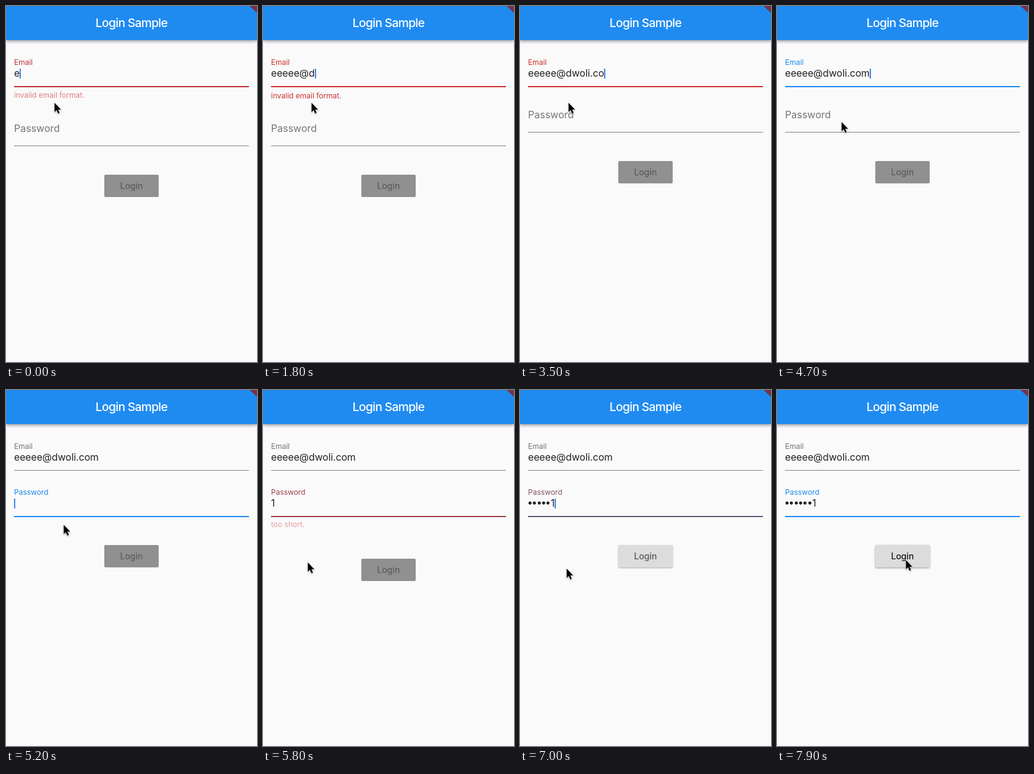
An HTML page for the animation above (8000 ms loop, 406x574 px).

```html
<!DOCTYPE html>
<html lang="en">
<head>
<meta charset="utf-8">
<title>Login Sample</title>
<style>
:root { --blue: #1f8bf1; --red: #d03030; --grey: #757575; }
html, body { margin: 0; width: 100%; height: 100%; overflow: hidden; background: #fafafa; }
#stage { position: relative; width: 406px; height: 574px; overflow: hidden; background: #fafafa;
  font-family: Inter, Roboto, sans-serif; color: #222; }
#stage * { box-sizing: border-box; }
.abs, .label, .value, .line, .error { position: absolute; white-space: nowrap; }
.anim { animation: 8s linear infinite; }

#bar { left: 0; top: 0; width: 406px; height: 55px; background: var(--blue);
  box-shadow: 0 2px 5px rgba(0,0,0,.4); color: #fff; text-align: center;
  font-size: 19.3px; font-weight: 500; letter-spacing: -.7px; line-height: 55px; }
#corner { right: 0; top: 0; width: 12px; height: 11px; background: #74324a;
  clip-path: polygon(0 0, 100% 0, 100% 100%); }

.label, .error { left: 13px; font-size: 12px; line-height: 16px; }
.value { left: 13px; height: 20px; line-height: 20px; font-size: 15.8px; letter-spacing: -.05px; white-space: pre; }
.line { left: 13px; width: 380px; height: 2px; }
.error { color: var(--red); }
.caret { display: inline-block; width: 2px; height: 16px; vertical-align: -2.5px; background: #4285e8; }
.dot { display: inline-block; width: 7.35px; height: 16px; vertical-align: -2.3px;
  background: radial-gradient(circle at 3.2px 8.2px, #222 2.1px, transparent 2.9px); }

#mailLabel { top: 83px; animation-name: mailLabel; }
#mail { top: 99px; }
#mailLine { top: 129px; animation-name: mailLine; }
#mailError { top: 137px; animation-name: mailError; }

#passBox { left: 0; top: 0; width: 406px; height: 0; animation-name: passShift; }
#passLabel { top: 165px; font-size: 16px; line-height: 20px; transform-origin: 0 50%; animation-name: passLabel; }
#pass { top: 173px; }
#passLine { top: 203px; animation-name: passLine; }
#passError { top: 211px; animation-name: passError; }

#btn { left: 159px; top: 250px; width: 88px; height: 36px; border-radius: 2px; text-align: center;
  font-size: 14px; font-weight: 500; line-height: 35px; animation-name: btnShift, btnLook; }
#mouse { left: 0; top: 0; overflow: visible; animation-name: mouse; }

@keyframes mailLabel {
  0% { color: #b5363c; } 2.5%, 44.1% { color: var(--red); }
  46.5%, 61.9% { color: var(--blue); } 64.4%, 100% { color: var(--grey); }
}
@keyframes mailLine {
  0% { background: #bd343b; } 2.5%, 44.1% { background: var(--red); }
  46.5%, 61.9% { background: var(--blue); height: 2px; }
  64.4%, 100% { background: #868686; height: 1px; }
}
@keyframes mailError {
  0% { opacity: .62; transform: translateY(-1.5px); }
  2%, 43.24% { opacity: 1; transform: none; }
  43.25%, 100% { opacity: 0; transform: none; }
}
@keyframes passShift {
  0%, 43.24% { transform: translateY(22px); }
  43.25%, 100% { transform: none; }
}
@keyframes passLabel {
  0%, 61.9% { transform: none; color: var(--grey); }
  64.4% { transform: translateY(-10.5px) scale(.75); color: var(--blue); }
  71.2% { color: var(--blue); } 72.5% { color: #9c434c; }
  74%, 86.2% { color: var(--red); } 87.5% { color: #85555f; }
  89%, 100% { transform: translateY(-10.5px) scale(.75); color: var(--blue); }
}
@keyframes passLine {
  0%, 61.9% { background: #868686; height: 1px; }
  64.4%, 71.2% { background: var(--blue); height: 2px; }
  72.5% { background: #a3414a; }
  74%, 86.2% { background: var(--red); } 87.5% { background: #5f6080; }
  89%, 100% { background: var(--blue); height: 2px; }
}
@keyframes passError {
  0%, 71.2% { opacity: 0; transform: translateY(-4px); }
  72.5% { opacity: .45; transform: translateY(-2px); }
  74%, 86.24% { opacity: 1; transform: none; }
  86.25%, 100% { opacity: 0; transform: none; }
}
@keyframes btnShift {
  0%, 43.24%, 71.25%, 86.24% { transform: translateY(22px); }
  43.25%, 71.24%, 86.25%, 100% { transform: none; }
}
@keyframes btnLook {
  0%, 86.24% { background: #909090; color: #5c5c5c; box-shadow: 0 0 0 transparent; }
  86.25% { background: #dcdcdc; color: #5c5c5c; box-shadow: 0 1px 2px rgba(0,0,0,.25); }
  87.5% { color: #585858; }
  89%, 100% { background: #dcdcdc; color: #161616; box-shadow: 0 1px 3px rgba(0,0,0,.42); }
}
@keyframes mouse {
  0%, 55.6% { transform: translate(78px, 156px); }
  58.6%, 63% { transform: translate(104px, 187px); }
  66.25% { transform: translate(86px, 236px); }
  69%, 78.5% { transform: translate(72px, 278px); }
  82%, 93.2% { transform: translate(75px, 288px); animation-timing-function: ease-in-out; }
  98%, 100% { transform: translate(208px, 274px); }
}
</style>
</head>
<body>
<div id="stage">
  <div id="bar" class="abs">Login Sample</div>
  <div id="corner" class="abs"></div>

  <div id="mailLabel" class="label anim">Email</div>
  <div id="mail" class="value"><span class="text"></span><i class="caret"></i></div>
  <div id="mailLine" class="line anim"></div>
  <div id="mailError" class="error anim">invalid email format.</div>

  <div id="passBox" class="abs anim">
    <div id="passLabel" class="label anim">Password</div>
    <div id="pass" class="value"><span class="text"></span><i class="caret"></i></div>
    <div id="passLine" class="line anim"></div>
    <div id="passError" class="error anim">too short.</div>
  </div>

  <div id="btn" class="abs anim">Login</div>
  <svg id="mouse" class="abs anim" width="14" height="20">
    <path d="M.5 0V15L3.9 11.9 6.4 17.4 8.8 16.3 6.4 11H11Z" fill="#000" stroke="#fff"
      stroke-width="1.2" paint-order="stroke" style="filter:drop-shadow(0 1px 1px rgba(0,0,0,.3))"/>
  </svg>
</div>
<script>
const LOOP = 8000, FOCUS = 4950;
const MAIL = 'eeeee@dwoli.com';
const mailKeys = [-100, 60, 860, 1080, 1280, 1480, 1750, 2000, 2380, 2560, 2680, 2900, 3200, 3450, 3680];
const passKeys = [5690, 5980, 6180, 6380, 6580, 6890, 7480];
const passBlinks = [5080, 6080, 6880, 7280];

const field = id => ({
  text: document.querySelector(`#${id} .text`),
  caret: document.querySelector(`#${id} .caret`),
  shown: -1
});
const mail = field('mail'), pass = field('pass');

const passed = (times, t) => times.filter(k => k <= t).length;
const clamp = x => Math.min(1, Math.max(0, x));

// Caret: 400 ms on, 200 ms fade out, 200 ms off, 200 ms fade in
function blink(times, t) {
  const age = t - times[Math.max(0, passed(times, t) - 1)];
  if (age < 400) return 1;
  const p = (age - 400) % 800;
  return p < 400 ? 1 - clamp(p / 200) : clamp((p - 400) / 200);
}

function setText(f, n, html) {
  if (f.shown === n) return;
  f.shown = n;
  f.text.innerHTML = html(n);
}

let start;
function draw(now) {
  start ??= now;
  const t = (now - start) % LOOP;
  setText(mail, passed(mailKeys, t), n => MAIL.slice(0, n));
  setText(pass, passed(passKeys, t), n => n ? '<i class="dot"></i>'.repeat(n - 1) + '1' : '');
  mail.caret.style.opacity = t < FOCUS ? blink(mailKeys, t) : 0;
  pass.caret.style.opacity = t < FOCUS ? 0 : blink(passBlinks, t);
  requestAnimationFrame(draw);
}
requestAnimationFrame(draw);
</script>
</body>
</html>
```
